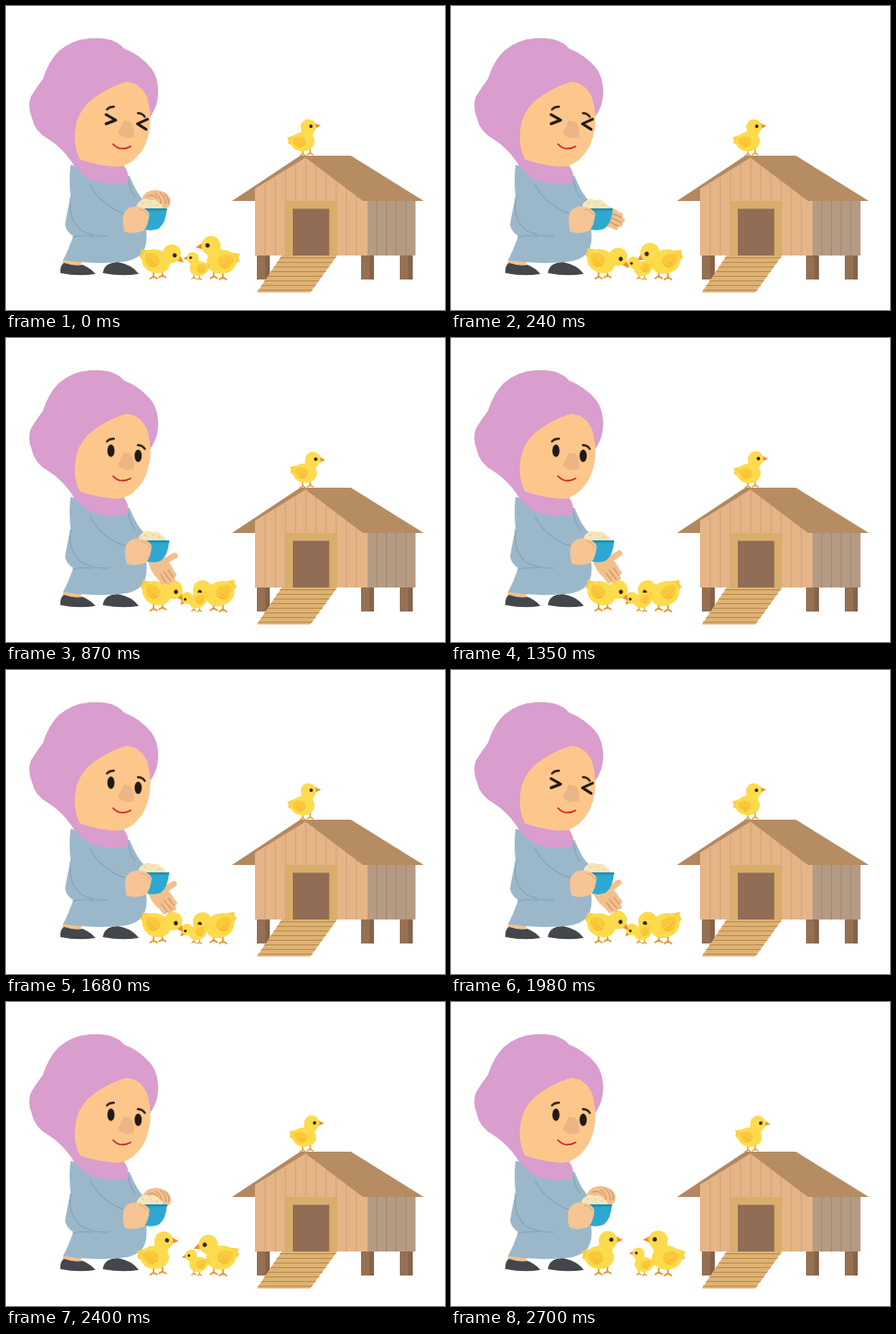
Write an HTML page that moves like this. It is 476 px wide and 329 px high and loops after 2730 ms.

```html
<!DOCTYPE html>
<html lang="en">
<head>
<meta charset="utf-8">
<title>Feeding the chicks</title>
<style>
html,body{margin:0;width:100%;height:100%;overflow:hidden;background:#fff}
svg{display:block;width:100%;height:100%}
.line{fill:none;stroke-linecap:round;stroke-linejoin:round}
</style>
</head>
<body>
<svg viewBox="0 0 476 329">
  <g id="house">
    <path fill="#967053" d="M272 268h14v28h-14zM385 268h14v28h-14zM427 268h14v28h-14z"/>
    <path fill="#876349" d="M281 270h5v26h-5zM394 270h5v26h-5zM436 270h5v26h-5z"/>
    <path fill="#b69b84" d="M392 208h52v62h-52z"/>
    <path fill="#e5b588" d="M270 270V198L325 163L392 209V270z"/>
    <path id="planks" class="line" stroke="#cfa077" stroke-width=".9"/>
    <path id="sidePlanks" class="line" stroke="#a2866f" stroke-width=".9"/>
    <path fill="#b4885f" d="M245 211L319 162H328L270 198V211z"/>
    <path fill="#b68c63" d="M322 162H374L453 211H387z"/>
    <path fill="#d9ad6c" d="M303 211h56v59h-56z"/>
    <path fill="#906d54" d="M311 219.500h39.500v50.500h-39.500z"/>
    <path fill="#deb272" d="M299 270H359L330 310H272z"/>
    <path id="rungs" class="line" stroke="#b98c52" stroke-width="1"/>
  </g>
  <g id="roofChick"></g>

  <g id="woman">
    <path fill="#f3c08d" d="M63 272H84L80 283Q70 281 61 279z"/>
    <path fill="#43474b" d="M59 289Q58 281 63 278Q75 282 83 280Q92 284 97 290Q78 293 59 289zM105 289Q106 278 121 277Q137 280 144 290Q124 293 105 289z"/>
    <path fill="#9bb8cb" d="M70 172Q68 186 70 207Q66 224 64 237Q66 245 73 249Q68 263 62 275Q92 280 125 277Q140 276 148 267Q154 258 152 242L150 211Q142 204 134 184z"/>
    <g class="line" stroke="#86a6bb" stroke-width="1.3">
      <path d="M70 208Q67 231 82 243Q96 250 111 249"/>
      <path d="M91 193Q98 208 113 217Q124 225 133 225"/>
      <path d="M73 250Q84 248 94 249"/>
      <path d="M133 189Q134 199 140 207"/>
    </g>
    <path fill="#d99dce" d="M91 35Q117 33 128 46Q146 53 158 68Q165 78 165 93Q165 108 157 119L128 173Q135 182 131 191Q112 195 91 188Q77 179 70 167Q60 153 46 144Q31 136 28 121Q23 109 27 98Q33 88 40 79Q46 60 57 49Q72 36 91 35z"/>
    <path fill="#fdc78b" d="M75 136Q76 116 92 102Q108 89 130 82Q146 83 153 99Q158 116 156 132Q153 152 143 162Q135 172 122 174Q100 173 80 166Q73 151 75 136z"/>
    <path fill="#ecb684" d="M128 124Q124 131 121 138Q127 145 139 142Q140 129 134 125z"/>
    <g class="line">
      <path stroke="#d3232d" stroke-width="1.7" d="M116 149.500Q124 158 135 152"/>
      <path stroke="#33261f" stroke-width="2.3" d="M109.500 112Q112 109 117 109M143 116Q148 116 150.500 120"/>
    </g>
    <g id="open" fill="#221a18">
      <ellipse cx="113.800" cy="122" rx="3.900" ry="6.700"/>
      <ellipse cx="143.300" cy="127.500" rx="3.900" ry="6.700"/>
    </g>
    <path id="shut" class="line" stroke="#221a18" stroke-width="3" d="M108.500 117.500L119 123.500L108.500 127.500M153.500 122.500L142.500 127.500L152 133.500"/>
  </g>

  <g id="rightChick"></g>
  <g id="smallChick"></g>
  <g id="leftChick"></g>

  <g id="fist">
    <path fill="#f3c08d" d="M147 209Q151 199 162 199Q174 200 178 208Q180 217 173 220H152z"/>
    <path class="line" stroke="#c98f60" stroke-width="1" d="M162 203Q168 206 168 214M167 202Q173 206 173 214M172 203Q177 207 176 214M153 206Q159 203 164 208"/>
  </g>
  <g id="hand">
    <path id="thumb" class="line" stroke="#f3c08d" stroke-width="6.500"/>
    <path class="line" stroke="#f3c08d" stroke-width="5.500" d="M12 -7L24 -8M12 -3L28 -4M12 2L28 1M12 6L25 6"/>
    <path fill="#f3c08d" d="M-4 -7Q8 -12 19 -11V9Q6 12 -4 7z"/>
    <path class="line" stroke="#c98f60" stroke-width="1" d="M16 -5.800L26 -6.300M15 -.8L28 -1.500M16 3.700L27 3.700"/>
  </g>
  <g id="bowl">
    <path fill="#f5e6ba" d="M143 220Q142 214 147 211Q151 207 157 210Q164 208 167 213Q172 215 172 220z"/>
    <path class="line" stroke="#dfca90" stroke-width="1" d="M149 213l2 1M157 212l2 2M164 216l2 -1"/>
    <path fill="#2fa8d1" d="M147 219H176Q175 235 167 241Q160 244 152 242z"/>
    <path fill="#1d8fba" d="M155 221.500H175.800L176 219H151z"/>
    <path fill="#f6c593" d="M129 225Q133 216 143 217Q154 218 157 225Q156 237 151 243Q139 248 130 244Q127 234 129 225z"/>
    <path class="line" stroke="#d9a373" stroke-width=".9" d="M146 220Q152 221 155 226"/>
  </g>
</svg>
<script>
const LOOP = 2730, STEP = 30, SWAY = 1800, BLINK = 300;
const el = id => document.getElementById(id);
const put = (node, name, value) => node.setAttribute(name, value);

// Plank and ramp lines
const fill = (id, n, line) => put(el(id), 'd', Array.from({length: n}, (_, i) => line(i)).join(''));
fill('planks', 10, i => {
  const x = 281 + i * 11;
  const top = x < 325 ? 198 - (x - 270) * .64 : 163 + (x - 325) * .72;
  return `M${x} ${top + 2}V270`;
});
fill('sidePlanks', 4, i => `M${402 + i * 10.5} 211V270`);
fill('rungs', 8, i => {
  const k = (i + .5) / 8;
  return `M${299 - 27 * k} ${270 + 40 * k}H${359 - 29 * k}`;
});

function makeChick(id, x, y, scale, dir = 1) {
  const root = el(id);
  put(root, 'transform', `translate(${x} ${y}) scale(${scale * dir} ${scale})`);
  root.innerHTML = `
    <path class="line" stroke="#e0982f" stroke-width="1.4" d="M-5 -8V-1M-8 0L-5 -2L-2 0M3 -8V-2M0 -1L3 -3L6 -1"/>
    <g>
      <path fill="#fbd040" d="M-9 -24L-20.500 -21L-19 -18L-20 -15L-9 -9z"/>
      <ellipse cx="-4" cy="-15.500" rx="13" ry="10.500" fill="#fddb4c"/>
      <path class="line" stroke="#fddb4c" stroke-width="13"/>
      <path fill="#fac93b" d="M-15 -19Q-6 -24 -1 -18Q1 -12 -6 -9Q-10 -8 -12 -12Q-15 -14 -15 -19z"/>
      <path class="line" stroke="#efb02f" stroke-width=".7" d="M-11 -15Q-8 -12 -5 -13M-8 -11Q-5 -9 -2 -13"/>
      <g>
        <path fill="#ef8d27" d="M7 -3.500L13.500 -.3L7 2.500z"/>
        <circle r="8.400" fill="#fddb4c"/>
        <circle cx="3" cy="-.5" r="1.900" fill="#33251c"/>
      </g>
    </g>`;
  const body = root.children[1], neck = body.children[2], head = body.lastElementChild;
  return (lean, peck) => {
    const hx = 3.5 + 5 * peck, hy = -31 + 6 * peck;
    put(body, 'transform', `rotate(${lean} 0 -2) rotate(${25 * peck} -3 -12)`);
    put(neck, 'd', `M0 -18L${hx - 1} ${hy + 2}`);
    put(head, 'transform', `translate(${hx} ${hy}) rotate(${25 * peck})`);
  };
}
const roof = makeChick('roofChick', 326.8, 162, 1);
const left = makeChick('leftChick', 166, 295, 1.2);
const small = makeChick('smallChick', 206, 296, .77, -1);
const right = makeChick('rightChick', 229, 296, 1.24, -1);

// Smooth interpolation through [time, value] pairs
function at(t, keys) {
  let i = 1;
  while (i < keys.length - 1 && t > keys[i][0]) i++;
  const [t0, a] = keys[i - 1], [t1, b] = keys[i];
  const k = Math.min(1, Math.max(0, (t - t0) / (t1 - t0)));
  return a + (b - a) * k * k * (3 - 2 * k);
}
const leftPeck = [[0, .75], [330, 1], [1500, 1], [1980, .9], [2190, .4], [2460, 0]];
const rightPeck = [[0, .15], [420, 1], [1890, 1], [2190, .82], [2580, 0]];
const smallPeck = [[0, .08], [420, 1], [2130, .95], [2550, 0]];
const reach = [[60, 0], [480, .88], [870, 1.06], [1350, 1], [1980, .92], [2190, .5], [2460, 0]];
const thumbOut = [[480, 0], [660, 1]];

function draw(t) {
  roof(-5 * Math.cos(2 * Math.PI * t / SWAY), 0);
  left(0, at(t, leftPeck));
  right(0, at(t, rightPeck));
  small(0, at(t, smallPeck));

  const shut = t % SWAY < BLINK;
  put(el('shut'), 'visibility', shut ? 'visible' : 'hidden');
  put(el('open'), 'visibility', shut ? 'hidden' : 'visible');

  const r = at(t, reach), low = r > .2;
  put(el('fist'), 'visibility', low ? 'hidden' : 'visible');
  put(el('hand'), 'visibility', low ? 'visible' : 'hidden');
  put(el('fist'), 'transform', `translate(${8 * r} ${30 * r})`);
  put(el('hand'), 'transform', `translate(${157 + 5 * r} ${215 + 24 * r}) rotate(${10 + 45 * r})`);
  const out = at(t, thumbOut);
  put(el('thumb'), 'd', `M6 -4L${6 + out} ${-4 - 16 * out}`);
  put(el('bowl'), 'transform', `translate(${-1.5 + 2.5 * Math.min(1, r)} 0)`);
}

const start = performance.now();
function tick() {
  const t = (performance.now() - start) % LOOP;
  draw(Math.floor(t / STEP) * STEP);
  requestAnimationFrame(tick);
}
tick();
</script>
</body>
</html>
```
